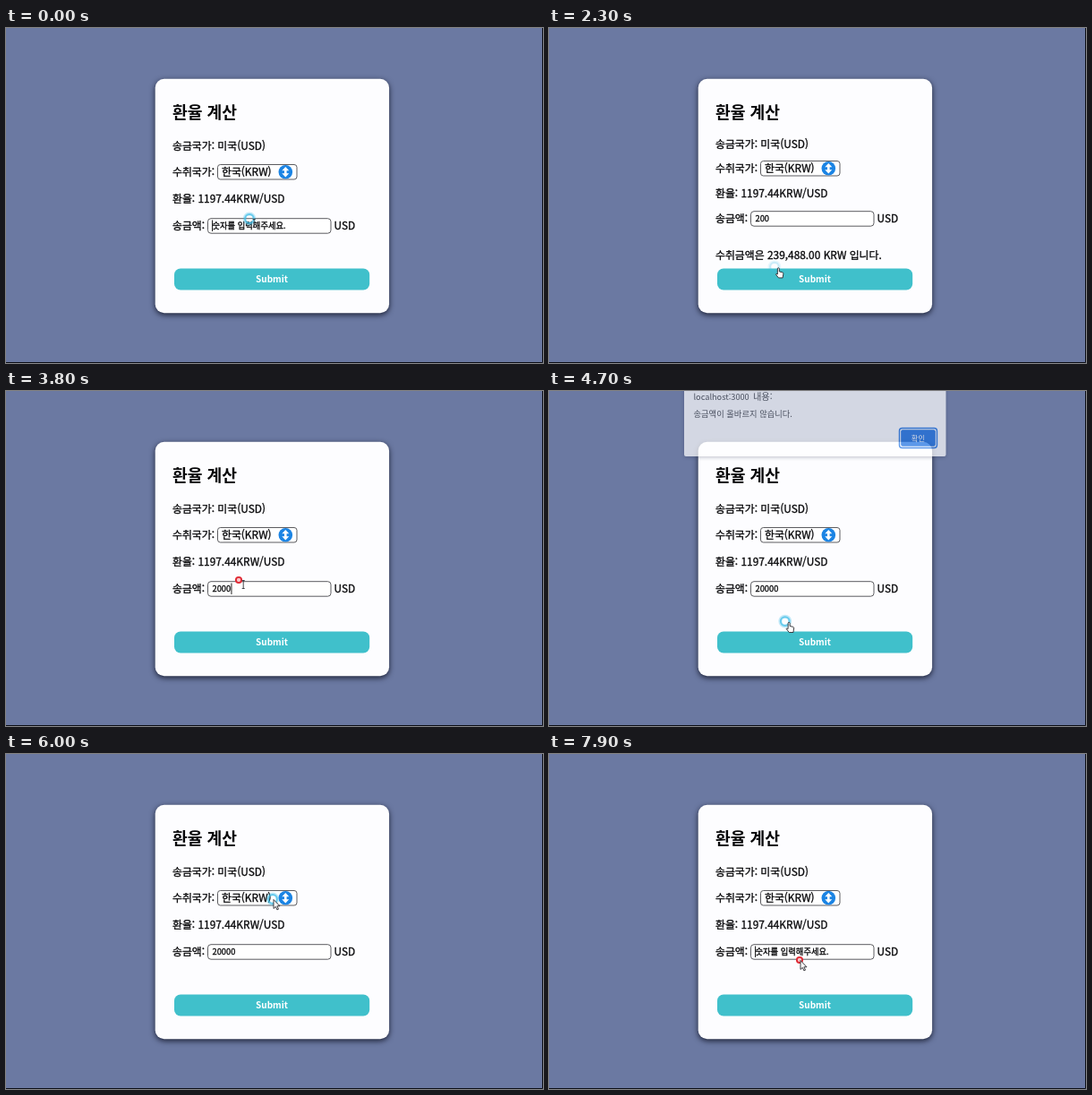
Write an HTML page that moves like this. It is 600 px wide and 374 px high and loops after 8000 ms.

```html
<!DOCTYPE html>
<html lang="ko">
<head>
<meta charset="utf-8">
<title>환율 계산</title>
<style>
  html, body { margin: 0; width: 100%; height: 100%; overflow: hidden; background: #6b79a2; }
  svg { display: block; width: 600px; height: 374px; }
  text { font-family: "Noto Sans CJK KR", "Noto Sans CJK JP", "Noto Sans CJK", sans-serif; font-size: 11.88px; fill: #08080a; stroke: #08080a; stroke-width: .3; white-space: pre; }
  .title { font-size: 18.2px; font-weight: 700; stroke: none; }
  .field { font-size: 9.3px; }
  .submit { font-size: 10px; font-weight: 700; fill: #fff; stroke: none; text-anchor: middle; }
  .box { fill: #fff; stroke: #4a4a4e; stroke-width: .9; }
  .card { fill: #fdfdff; filter: drop-shadow(0 2px 3px rgba(10, 14, 30, .85)); }
  .dialog { fill: #fff; filter: drop-shadow(0 1px 2px rgba(20, 30, 60, .4)); }
  #alert text { fill: #3c3f44; stroke: none; }
  #alert .ok { font-size: 8.3px; fill: #fff; text-anchor: middle; }
  .cursor { fill: #fff; stroke: #26262c; stroke-width: .9; stroke-linejoin: round; }
</style>
</head>
<body>
<svg viewBox="0 0 600 374">
  <rect width="600" height="374" fill="#6b79a2"/>
  <path d="M0 373.5H599.5V0" fill="none" stroke="#0c0e16"/>
  <rect class="card" x="166.7" y="56.8" width="261.4" height="261.4" rx="10"/>
  <text class="title" x="186" y="101">환율 계산</text>

  <g class="row"><text x="186" y="135.5">송금국가: 미국(USD)</text></g>
  <g class="row">
    <text x="186" y="165">수취국가:</text>
    <rect class="box" x="236.5" y="152.5" width="88.5" height="16.5" rx="3"/>
    <text x="241" y="165">한국(KRW)</text>
    <circle cx="312.3" cy="160.7" r="7.8" fill="#1b84e4"/>
    <path d="M312.3 155l4 4.2h-2.7v3h2.7l-4 4.2l-4-4.2h2.7v-3h-2.7z" fill="#fff"/>
  </g>
  <g class="row"><text x="186" y="194.5">환율: 1197.44KRW/USD</text></g>
  <g class="row">
    <text x="186" y="224.5">송금액:</text>
    <rect class="box" x="225.5" y="212.7" width="137.5" height="16.5" rx="3.5"/>
    <text id="amount" class="field" x="230.5" y="224.3"></text>
    <rect id="caret" y="214.5" width="1" height="12.5" fill="#222"/>
    <text x="366.5" y="224.5">USD</text>
  </g>
  <text id="result" x="186" y="257.5"></text>

  <rect x="188" y="268.5" width="218.2" height="24" rx="7" fill="#40c0cb"/>
  <text class="submit" x="297" y="284.2">Submit</text>

  <g id="alert">
    <path class="dialog" d="M151-8H443.5V77a2 2 0 0 1-2 2H153a2 2 0 0 1-2-2z"/>
    <text x="161.5" y="16" style="font-size:9.2px">localhost:3000</text>
    <text x="228" y="16" style="font-size:10.2px">내용:</text>
    <text x="161.5" y="34.5" style="font-size:9.3px">송금액이 올바르지 않습니다.</text>
    <rect x="391.5" y="47.5" width="42" height="22" rx="3" fill="#fff" stroke="#1a6fe0" stroke-width="1.4"/>
    <rect x="393.2" y="49.2" width="38.6" height="18.6" rx="2" fill="#1a6fe0"/>
    <text class="ok" x="412.5" y="61.5">확인</text>
  </g>

  <g id="pointer">
    <g id="halo" fill="none" stroke="#3fbde8">
      <circle r="5.4" stroke-width="4" opacity=".3"/>
      <circle r="4.9" stroke-width="2" opacity=".7"/>
    </g>
    <circle id="press" r="3.1" fill="#f8c9cb" stroke="#e02a35" stroke-width="1.9"/>
    <path id="arrow" class="cursor" d="M1 .5v10l2.3-2.1 1.6 3.5 1.6-.7-1.6-3.4h3.1z"/>
    <path id="hand" class="cursor" d="M3.4 7.4V2.2a1 1 0 0 1 2 0V5.4l3.6.9q1 .3 .9 1.4l-.7 4.7H4.6L1.5 8.6q-.1-1.3 1.9-.2z"/>
    <path id="beam" d="M3.7.5h3M3.7 9.5h3M5.2.5v9" fill="none" stroke="#33343a" stroke-width=".9"/>
  </g>
</svg>
<script>
  const LOOP = 8000, STEP = 100, PRESS = 200, TRAVEL = 600;
  const RATE = 1197.44, LIMIT = 10000;
  const PLACEHOLDER = "숫자를 입력해주세요.";
  const CONFIRM = 5300, RESET = 6800;

  // The first focus click lands just before the loop restarts.
  const rounds = [
    { text: "200", focus: -PRESS, type: 700, submit: 2000 },
    { text: "2000", focus: 2700, type: 2900, submit: 3300 },
    { text: "20000", focus: 3700, type: 4000, submit: 4400 }
  ];
  const clicks = [...rounds.flatMap(r => [r.focus, r.submit]), CONFIRM];

  const hint = [272, 213], digits = [260, 211], edge = [280, 230];
  const button = [251, 273], confirm = [423, 58], select = [298, 162];
  const stops = [
    { at: 0, place: hint }, { at: 500, place: edge },
    ...rounds.flatMap(r => [{ at: r.focus, place: digits }, { at: r.submit, place: button }]).slice(1),
    { at: CONFIRM - STEP, place: confirm }, { at: 6000, place: select }, { at: LOOP - PRESS, place: edge }
  ];

  const $ = id => document.getElementById(id);
  const rows = document.querySelectorAll(".row");
  const ramp = (t, from, to) => Math.min(1, Math.max(0, (t - from) / (to - from)));
  const ease = k => k * k * (3 - 2 * k);
  const show = (el, on) => el.setAttribute("visibility", on ? "visible" : "hidden");

  function pointerAt(t) {
    const i = stops.findIndex(stop => stop.at > t);
    if (i < 0) return stops.at(-1).place;
    const from = stops[i - 1], to = stops[i];
    const leave = Math.max(from.at + PRESS, to.at - TRAVEL);
    const e = ease(ramp(t, leave, to.at));
    return from.place.map((v, axis) => v + (to.place[axis] - v) * e);
  }

  function typedAt(t) {
    const i = rounds.findLastIndex(r => r.type <= t);
    if (i < 0 || t >= RESET) return "";
    const kept = i ? rounds[i - 1].text.length : 0;
    return rounds[i].text.slice(0, kept + 1 + (t - rounds[i].type) / STEP);
  }

  function drawForm(t) {
    const value = typedAt(t);
    const round = rounds.findLast(r => r.focus <= t);
    const done = t > round.submit && value > 0 && value < LIMIT;
    const sum = (value * RATE).toLocaleString("en-US", { minimumFractionDigits: 2, maximumFractionDigits: 2 });
    $("amount").textContent = value || PLACEHOLDER;
    $("result").textContent = done ? `수취금액은 ${sum} KRW 입니다.` : "";
    $("caret").setAttribute("x", value ? 230.8 + value.length * 5.16 : 230);
    show($("caret"), t < round.submit && (t - round.focus) % 1060 < 530);
    rows.forEach((row, i) => row.setAttribute("transform", `translate(0 ${done ? -2 - 2 * i : 0})`));
  }

  function drawAlert(t) {
    const opened = rounds.at(-1).submit + 150;
    const enter = ramp(t, opened, opened + 300);
    const leave = ramp(t, CONFIRM + 150, CONFIRM + 350);
    $("alert").setAttribute("opacity", Math.sqrt(enter) * (1 - leave));
    $("alert").setAttribute("transform", `translate(0 ${-12 * (1 - enter) - 6 * leave})`);
  }

  function drawPointer(t) {
    const [x, y] = pointerAt(t);
    const pressed = clicks.some(at => (t - at + LOOP) % LOOP < PRESS);
    const onButton = y > 252, onInput = y > 206 && y < 226 && x > 220 && x < 360;
    $("pointer").setAttribute("transform", `translate(${x} ${y})`);
    show($("press"), pressed);
    show($("halo"), !pressed);
    $("halo").setAttribute("opacity", y > 265 ? .35 : 1);
    show($("hand"), onButton);
    show($("beam"), onInput);
    show($("arrow"), !onButton && !onInput);
  }

  function frame(now) {
    const t = Math.floor(now % LOOP / STEP) * STEP;
    drawForm(t < LOOP - PRESS ? t : t - LOOP);
    drawAlert(t);
    drawPointer(t);
    requestAnimationFrame(frame);
  }
  frame(0);
</script>
</body>
</html>
```
